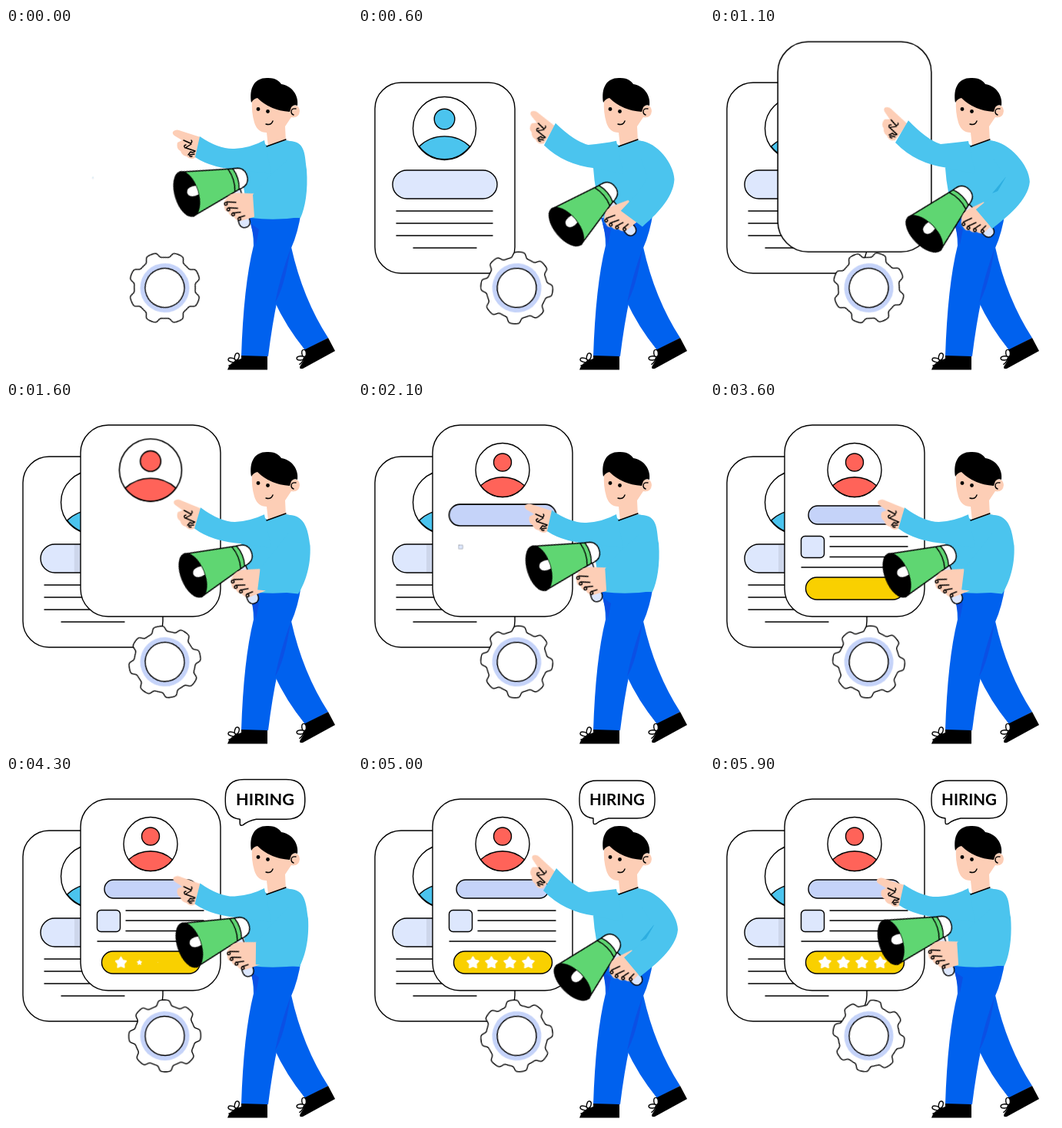
An HTML page for the animation above (6000 ms loop, 450 px wide and 450 px high).

```html
<!DOCTYPE html>
<html lang="en">
<head>
<meta charset="utf-8">
<title>Hiring</title>
<style>
html,body{margin:0;width:100%;height:100%;overflow:hidden;background:#fff}
svg{display:block;width:100vw;height:100vh}
.ink{stroke:#000;stroke-width:1.4;stroke-linecap:round;stroke-linejoin:round}
.line{fill:none}
.white{fill:#fff}
.skin{fill:#fdceb6}
.shirt{fill:#4bc4ee}
.pants{fill:#0061ee}
.red{fill:#ff6359}
.pale{fill:#dde7fd}
.lilac{fill:#c5d3f9}
[data-pop]{transform-box:fill-box;transform-origin:center}
[data-wipe]{transform-box:fill-box;transform-origin:left}
.swing{animation:1s cubic-bezier(.8,0,.2,1) infinite alternate}
#sleeveL{animation-name:sleeveL}
#sleeveR{animation-name:sleeveR}
#point{animation-name:point}
#horn{animation-name:horn}
#gear{animation:spin 3s linear infinite}
@keyframes sleeveL{
  from{d:path("M252 141Q277 158 297 157Q318 156 336 146L345 190L309 185Q268 183 246 168Z")}
  to{d:path("M258 120Q282 145 300 151Q320 149 336 147L345 190L309 182Q268 177 241 149Z")}
}
@keyframes sleeveR{
  from{d:path("M368 147C391 147 388 168 391 184C393 212 389 234 383 247L323 246L321 217L340 195L368 170Z")}
  to{d:path("M368 147C388 149 416 178 416 200C414 224 386 246 367 261L346 236L374 213L385 194L368 170Z")}
}
@keyframes point{
  from{transform:translate(249px,155px)}
  to{transform:translate(248px,135px) rotate(25deg)}
}
@keyframes horn{
  from{transform:translate(235px,216px) rotate(-17deg)}
  to{transform:translate(279px,268px) rotate(-45deg)}
}
@keyframes spin{
  from{transform:translate(206.5px,338px) rotate(22.5deg)}
  to{transform:translate(206.5px,338px) rotate(382.5deg)}
}
text{font:700 20.5px Lato,"Open Sans",sans-serif}
</style>
</head>
<body>
<svg viewBox="0 0 450 450">
  <defs>
    <g id="bow" class="ink white">
      <ellipse cx="-4" cy="1" rx="5" ry="2.6" transform="rotate(15)"/>
      <ellipse cx="1" cy="-5" rx="2.8" ry="4.6" transform="rotate(15)"/>
      <path class="line" d="M1 1Q7 0 6 7M0 1Q-3 6 -8 7"/>
    </g>
  </defs>

  <g data-pop="0" class="ink">
    <rect class="white" x="22" y="71" width="182" height="248" rx="34"/>
    <circle class="white" cx="112.5" cy="130.5" r="41"/>
    <circle class="shirt" cx="112.5" cy="118.5" r="13.3"/>
    <path class="shirt" d="M79.5 154A48 48 0 0 1 145.5 154A41 41 0 0 1 79.5 154Z"/>
    <rect class="pale" x="45" y="185" width="136" height="37" rx="18.5"/>
    <path d="M50 238H175M50 254H175M50 270H175M72 286H154"/>
  </g>

  <rect data-pop="1100" x="89" y="186" width="9" height="35" opacity=".07"/>
  <g data-pop="800" class="ink">
    <rect class="white" x="97" y="30" width="182" height="249" rx="36"/>
  </g>
  <g data-pop="1250" class="ink">
    <circle class="white" cx="188" cy="88.5" r="35"/>
    <circle class="red" cx="188" cy="78.5" r="11.5"/>
    <path class="red" d="M159.5 108.8A42.4 42.4 0 0 1 216.5 108.8A35 35 0 0 1 159.5 108.8Z"/>
  </g>
  <rect data-pop="1750" class="ink lilac" x="128" y="135" width="120" height="24" rx="12"/>
  <rect data-pop="2000" class="ink pale" x="118.5" y="174.5" width="30" height="28" rx="5"/>
  <path data-wipe="2650" class="ink" d="M156 175H257"/>
  <path data-wipe="2750" class="ink" d="M156 188H257"/>
  <path data-wipe="2850" class="ink" d="M156 201.500H257"/>
  <path data-wipe="2950" class="ink" d="M119 215H257"/>
  <rect data-pop="2950" class="ink" fill="#f9d000" x="124.5" y="228" width="128" height="29" rx="14.5"/>
  <g id="stars"></g>

  <g id="gear">
    <path id="cog" class="ink white"/>
    <circle class="lilac" r="32"/>
    <circle class="ink white" r="25.5"/>
  </g>

  <g data-pop="3800">
    <path class="ink white" d="M311 6H363Q386 6 386 29V33Q386 55 363 55H326Q316 57 310 62Q306 64 306 60V55Q288 53 288 33V29Q288 6 311 6Z"/>
    <text x="337" y="37.500" text-anchor="middle">HIRING</text>
  </g>

  <!-- legs and shoes -->
  <path class="pants" d="M335 255L371 285Q386 352 419 403L389 419Q364 388 349 355Z"/>
  <path class="pants" d="M316 247L384 238Q380 266 371 286Q351 345 341 427H306Q309 335 322 283Q322 264 316 247Z"/>
  <path fill="#0b50e4" d="M370 287Q357 322 350 357Q362 338 370 287ZM318 254L325 282L329 262Z"/>
  <path d="M306 426L340 427V444.500H288Q291 434 306 430ZM389 418L419 403L428 420L386 443Q380 444 383 439Q390 430 389 418Z"/>
  <use href="#bow" x="298" y="432"/>
  <use href="#bow" transform="translate(387 428) rotate(-20)"/>

  <!-- head -->
  <path class="skin" d="M320 94Q319 110 323 123Q327 136 339 136L341 154L364 148L363 128L371 116Q381 118 382 108Q381 99 374 101L345 82Z"/>
  <path d="M319 97C316 78 323 64 341 65C352 65 356 70 358 73C372 75 381 88 379 101Q374 99 371 103L369 109Q343 107 327 91Q322 92 319 97Z"/>
  <path class="ink line" d="M377 105Q371 104 371 109Q371 112 374 113M338 125Q345 127 347 121"/>
  <circle cx="328" cy="105.500" r="2.4"/>
  <circle cx="340.500" cy="108.500" r="2.4"/>

  <!-- torso and pointing arm -->
  <path class="shirt" d="M332 148L340 153L364 146C381 148 389 160 388 178L383 246Q350 251 319 247Q308 215 306 182Z"/>
  <path fill="#2daee0" d="M386 192L367 215L377 211Z"/>
  <path class="ink line" d="M339 154L364 145"/>
  <g id="point" class="swing">
    <path class="skin" d="M-31 -21Q-27 -24 -21 -21L4 -13L-2 13Q-9 18 -14 12Q-20 11 -22 5Q-28 2 -26 -6L-20 -9L-30 -15Q-34 -18 -31 -21Z"/>
    <path class="ink line" stroke-width="1.100" d="M-18 -9L-9 -5Q-6 -7 -8 -9M-8 -4L-16 1Q-19 -2 -15 -3M-15 1L-3 5Q-5 8 -9 6L-12 10M-7 12Q-11 13 -10 10L-4 9"/>
  </g>
  <path id="sleeveL" class="swing shirt"/>

  <!-- megaphone -->
  <g id="horn" class="swing">
    <rect class="ink pale" x="54" y="6" width="14.500" height="58" rx="7"/>
    <path class="ink white" d="M67 -14Q82 -13 82 0Q82 13 67 14Z"/>
    <path class="ink" fill="#5fd672" d="M0 -30L67 -14Q72 0 67 14L0 30Z"/>
    <path class="ink line" d="M61 -15Q66 0 61 15"/>
    <ellipse class="ink" rx="15" ry="30"/>
    <path class="white" d="M14.500 -7Q2 -9 1 -1Q2 7 14.500 5Q15.500 0 14.500 -7Z"/>
    <path class="skin" d="M46 22Q53 15 64 18L84 25L80 54L59 54Q51 53 50 46Q45 44 45 38Q40 35 42 30Q42 24 46 22Z"/>
    <path class="ink line" stroke-width="1.100" d="M47 25L58 29M47 33L58 37M50 41L60 43M56 49L64 49"/>
    <g class="ink skin" stroke-width="1.100">
      <circle cx="45" cy="27" r="1.800"/><circle cx="46" cy="35" r="1.800"/>
      <circle cx="50" cy="43" r="1.800"/><circle cx="56" cy="51" r="1.800"/>
    </g>
  </g>
  <path id="sleeveR" class="swing shirt"/>
</svg>
<script>
const LOOP = 6000;
const $ = id => document.getElementById(id);
const polar = (r, a) => `${(r * Math.cos(a)).toFixed(2)} ${(r * Math.sin(a)).toFixed(2)}`;
const ring = (n, radius, turn = 0) =>
  'M' + Array.from({length: n}, (_, i) => {
    const a = i / n * 2 * Math.PI;
    return polar(radius(a, i), a + turn);
  }).join('L') + 'Z';

$('cog').setAttribute('d', ring(192, a => 43.2 + 3.6 * Math.tanh(2.6 * Math.cos(8 * a))));

const star = ring(10, (a, i) => i % 2 ? 4.2 : 7.6, -Math.PI / 2);
$('stars').innerHTML = [0, 1, 2, 3].map(i =>
  `<g transform="translate(${149.5 + 24 * i} 243)"><path data-pop="${4050 + 100 * i}" d="${star}" fill="#fff" stroke="#fff" stroke-width="2" stroke-linejoin="round"/></g>`
).join('');

// keys: [time, transform] pairs, held until the loop ends
function play(el, keys) {
  const frames = keys.map(([time, transform]) => ({transform, offset: time / LOOP, easing: 'ease-in-out'}));
  frames.push({transform: keys.at(-1)[1], offset: 1});
  el.animate(frames, {duration: LOOP, iterations: Infinity});
}

document.querySelectorAll('[data-pop]').forEach(el => {
  const start = +el.dataset.pop;
  const small = `scale(${start ? 0 : .015})`;
  play(el, [[0, small], [start, small], [start + 360, 'scale(1.16)'], [start + 600, 'scale(1)']]);
});
document.querySelectorAll('[data-wipe]').forEach(el => {
  const start = +el.dataset.wipe;
  play(el, [[0, 'scale(0,1)'], [start, 'scale(0,1)'], [start + 400, 'scale(1)']]);
});
</script>
</body>
</html>
```
